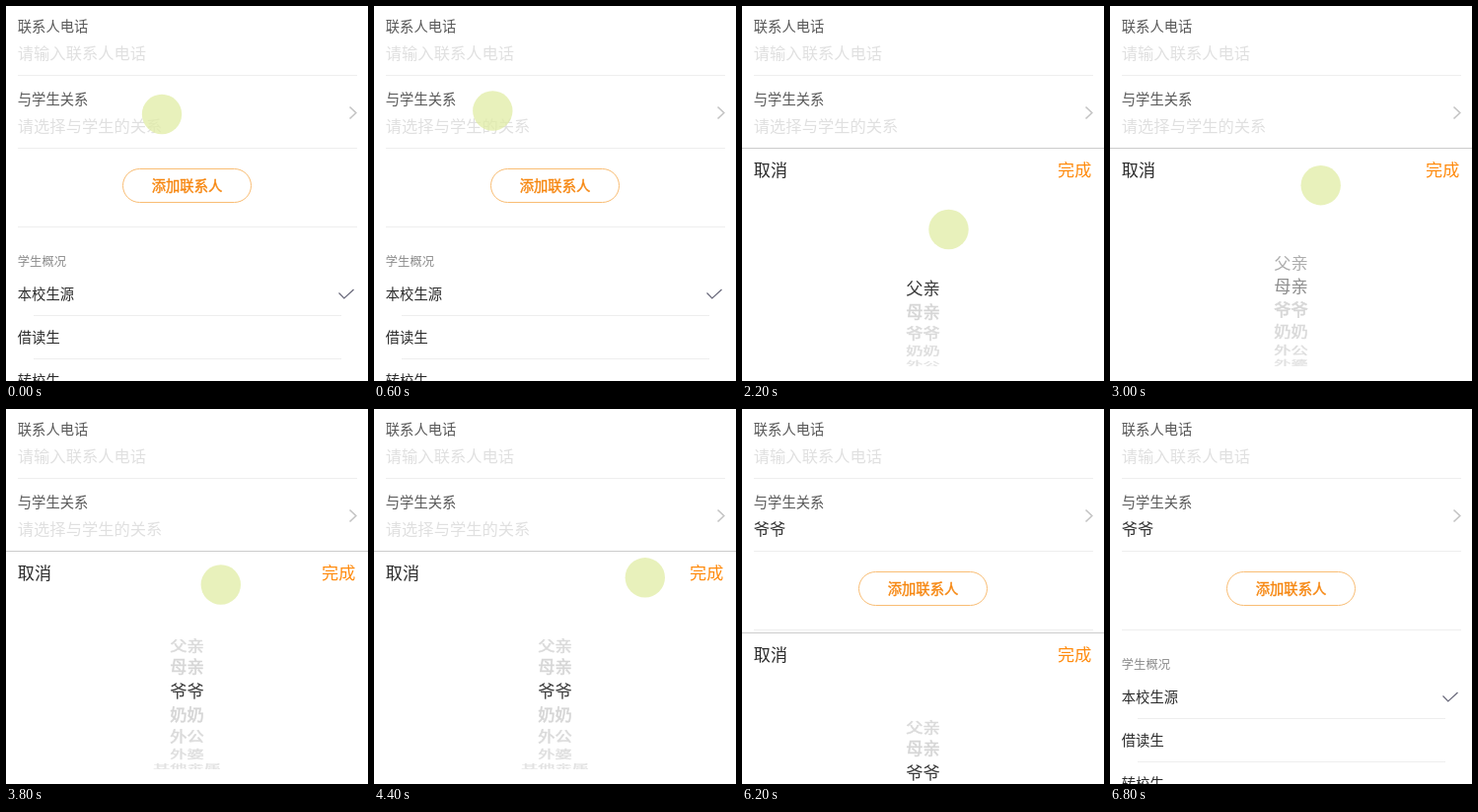
Write an HTML page with a canvas that moves like this. It is 367 px wide and 381 px high and loops after 8000 ms.

```html
<!DOCTYPE html>
<html lang="zh-CN">
<head>
<meta charset="utf-8">
<title>联系人</title>
<style>
  html, body { margin: 0; width: 100%; height: 100%; overflow: hidden; background: #fff; }
  canvas { display: block; width: 367px; height: 381px; }
</style>
</head>
<body>
<canvas id="stage" width="367" height="381"></canvas>
<script>
const ctx = document.getElementById('stage').getContext('2d');
const W = 367, H = 381, LOOP = 8000, STEP = 200;
const PANEL_TOP = 144, PANEL_HEIGHT = H - PANEL_TOP;
const FONT = '"Noto Sans CJK SC", "Noto Sans CJK", sans-serif';
const ROWS = ['父亲', '母亲', '爷爷', '奶奶', '外公', '外婆', '其他亲属'];
const WHEEL = { x: 183.5, y: 286.2, radius: 84, angle: 0.29 };

const easeIn = u => u * u;
const easeOut = u => 1 - (1 - u) ** 3;
const easeInOut = u => u * u * (3 - 2 * u);

const DOT_START = { x: 158, y: 110 };
const DOT_MOVES = [
  { from: 0, to: 600, x: 120.3, y: 106.5, ease: easeInOut },
  { from: 1600, to: 2200, x: 209.5, y: 227, ease: easeInOut },
  { from: 2200, to: 3150, x: 214, y: 179, ease: easeInOut },
  { from: 3600, to: 4600, x: 309, y: 167, ease: easeIn },
  { from: 4600, to: 5400, x: 340, y: 163, ease: easeInOut }
];

const clamp = v => Math.min(1, Math.max(0, v));
const progress = (t, from, to, ease) => ease(clamp((t - from) / (to - from)));
const mix = (a, b, u) => a + (b - a) * u;

// Places ideographs with their em box centred vertically on y; heft thickens the strokes.
function text(str, x, y, size, color, { align = 'left', heft = 0 } = {}) {
  ctx.font = `${size}px ${FONT}`;
  ctx.textAlign = align;
  ctx.fillStyle = ctx.strokeStyle = color;
  ctx.fillText(str, x, y + size * 0.38);
  if (heft) {
    ctx.lineWidth = heft;
    ctx.strokeText(str, x, y + size * 0.38);
  }
}

function stroke(points, color, width = 1) {
  ctx.beginPath();
  points.forEach(([x, y]) => ctx.lineTo(x, y));
  ctx.strokeStyle = color;
  ctx.lineWidth = width;
  ctx.stroke();
}

const rule = (y, x1 = 12, x2 = 356, color = '#eee') => stroke([[x1, y + 0.5], [x2, y + 0.5]], color);

function drawField(y, label, value, color) {
  text(label, 11.8, y, 14.3, '#595959');
  text(value, 11.8, y + 27, 16.3, color);
  rule(y + 49.5 | 0);
}

function drawForm(chosen) {
  drawField(20.6, '联系人电话', '请输入联系人电话', '#e0e0e0');
  drawField(94.7, '与学生关系', chosen ? '爷爷' : '请选择与学生的关系', chosen ? '#333' : '#e0e0e0');
  stroke([[348.5, 102.5], [354.8, 108.5], [348.5, 114.5]], '#c4c4c4', 1.6);

  ctx.beginPath();
  ctx.roundRect(118.5, 165.5, 130, 34, 17);
  ctx.strokeStyle = '#f9bd74';
  ctx.lineWidth = 1;
  ctx.stroke();
  text('添加联系人', 183.5, 182.3, 14.3, '#f6860f', { align: 'center', heft: 0.4 });
  rule(224);

  text('学生概况', 11.8, 259, 12.3, '#8a8a8a');
  ['本校生源', '借读生', '转校生'].forEach((label, i) => {
    text(label, 11.8, 292.7 + 44 * i, 14.3, '#2b2b2b');
    rule(314 + 44 * i, 28, 340);
  });
  stroke([[337.5, 291.5], [342.8, 297], [352.5, 288]], '#666678', 1.2);
}

function drawWheel(t) {
  const last = 2;
  const scroll = last * progress(t, 2200, 3720, easeInOut);
  const focus = last * progress(t, 2550, 3800, easeInOut);
  ctx.save();
  ctx.beginPath();
  ctx.rect(0, 190, W, 176);
  ctx.clip();
  ROWS.forEach((label, i) => {
    const d = i - scroll;
    if (Math.abs(d) > 4.45) return;
    const dark = clamp(1 - Math.abs(i - focus)) ** 1.5;
    const gray = Math.round(mix(210 + 4 * Math.abs(d), 58, dark));
    ctx.save();
    ctx.translate(WHEEL.x, WHEEL.y + WHEEL.radius * Math.sin(d * WHEEL.angle));
    ctx.scale(1, Math.cos(d * WHEEL.angle));
    text(label, 0, 0, 17.3, `rgb(${gray},${gray},${gray})`, { align: 'center', heft: dark > 0.1 ? 0 : 0.6 });
    ctx.restore();
  });
  ctx.restore();
}

function drawPanel(t) {
  const shown = progress(t, 1080, 1600, easeOut) - progress(t, 5900, 6650, easeInOut);
  if (shown <= 0) return;
  const pressed = t >= 5400 && t < 5800;
  ctx.save();
  ctx.translate(0, Math.round(PANEL_HEIGHT * (1 - shown)));
  ctx.fillStyle = '#fff';
  ctx.fillRect(0, PANEL_TOP, W, H);
  rule(PANEL_TOP, 0, W, '#ccc');
  text('取消', 11.8, 167, 17.1, '#2b2b2b');
  ctx.globalAlpha = pressed ? 0.25 : 1;
  text('完成', 354.3, 167, 17.1, '#ff8a0c', { align: 'right' });
  ctx.globalAlpha = 1;
  drawWheel(t);
  ctx.restore();
}

function drawDot(t) {
  if (t >= 6000) return;
  let { x, y } = DOT_START;
  for (const move of DOT_MOVES) {
    const u = progress(t, move.from, move.to, move.ease);
    x = mix(x, move.x, u);
    y = mix(y, move.y, u);
  }
  ctx.beginPath();
  ctx.arc(x, y, 20.2, 0, Math.PI * 2);
  ctx.fillStyle = 'rgba(225,236,164,0.75)';
  ctx.fill();
}

function frame(now) {
  const t = Math.floor((now % LOOP) / STEP) * STEP;
  ctx.fillStyle = '#fff';
  ctx.fillRect(0, 0, W, H);
  drawForm(t >= 5800);
  drawPanel(t);
  drawDot(t);
  requestAnimationFrame(frame);
}

frame(0);
</script>
</body>
</html>
```
